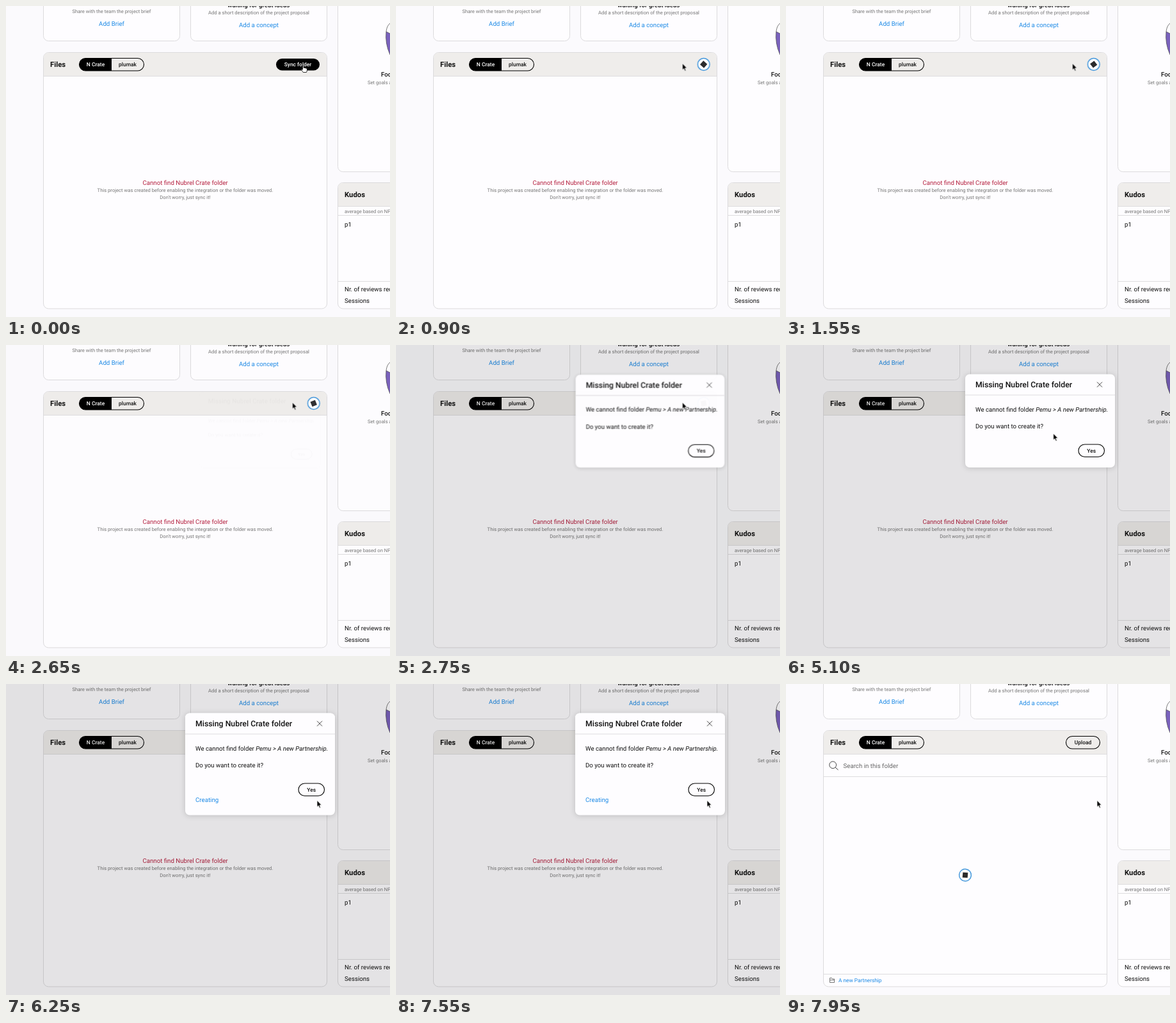
An HTML page that plays this animation: 600x485 px, repeating every 8000 ms.

```html
<!DOCTYPE html>
<html lang="en">
<head>
<meta charset="utf-8">
<title>Sync folder</title>
<style>
html, body { margin: 0; width: 100%; height: 100%; overflow: hidden; background: #fbfafd; }
svg { display: block; width: 600px; height: 485px; }
text { font: 9.7px Roboto, sans-serif; fill: #111; text-rendering: geometricPrecision; }
.small { font-size: 7.65px; fill: #777; }
.head { font-size: 11.3px; font-weight: 700; }
.title { font-size: 12.3px; font-weight: 500; }
.button { font-size: 8.45px; font-weight: 500; }
.medium { font-weight: 500; }
.link { fill: #1c8ae6; }
.error { fill: #b5203f; }
.light { fill: #fff; }
.mid { text-anchor: middle; }
.card { fill: #fefdff; stroke: #dcdbdd; }
.bar { fill: #efedeb; }
.rule { stroke: #dedddf; fill: none; }
.pill { fill: none; stroke: #000; stroke-width: 1.1; }
.solid { fill: #000; }

/* One loop is 8 s: 1.25% = 100 ms */
.sync, .busy, .before, .after, .creating, .hover, .hand, .arrow {
  animation: 8s step-end infinite;
}
.sync { animation-name: sync; }
.busy { animation-name: busy; }
.before { animation-name: before; }
.after { animation-name: after; }
.creating { animation-name: creating; }
.hover { animation-name: hover; }
.hand { animation-name: hand; }
.arrow { animation-name: arrow; }
@keyframes sync { 0% { opacity: 1 } 1.875%, 100% { opacity: 0 } }
@keyframes busy { 0% { opacity: 0 } 1.875% { opacity: 1 } 35.625%, 100% { opacity: 0 } }
@keyframes before { 0% { opacity: 1 } 95%, 100% { opacity: 0 } }
@keyframes after { 0% { opacity: 0 } 95%, 100% { opacity: 1 } }
@keyframes creating { 0% { opacity: 0 } 72.5%, 100% { opacity: 1 } }
@keyframes hover { 0% { opacity: 0 } 66.875% { opacity: 1 } 75%, 100% { opacity: 0 } }
@keyframes hand { 0% { opacity: 1 } 1.875% { opacity: 0 } 66.875% { opacity: 1 } 75%, 100% { opacity: 0 } }
@keyframes arrow { 0% { opacity: 0 } 1.875% { opacity: 1 } 66.875% { opacity: 0 } 75%, 100% { opacity: 1 } }

.spin { animation: spin 1.6s -50ms linear infinite; }
@keyframes spin { to { transform: rotate(360deg) } }

.dim { animation: fade 8s cubic-bezier(.16, 1, .3, 1) infinite; }
.dialog {
  transform-origin: 397px 118px;
  animation: fade 8s cubic-bezier(.16, 1, .3, 1) infinite, pop 8s cubic-bezier(.16, 1, .3, 1) infinite;
  filter: drop-shadow(0 1px 4px rgba(0, 0, 0, .16));
}
@keyframes fade { 0%, 33.125% { opacity: 0 } 35.625%, 95% { opacity: 1 } 97.5%, 100% { opacity: 0 } }
@keyframes pop {
  0%, 33.125% { transform: translateY(15px) scale(.8) }
  35.625%, 95% { transform: none }
  97.5%, 100% { transform: translateY(15px) scale(.8) }
}

.cursor { animation: move 8s ease-in-out infinite; }
@keyframes move {
  0%, 1.875% { transform: translate(464px, 92px) }
  8.75%, 37.5% { transform: translate(447.5px, 89.5px) }
  45.625%, 48.75% { transform: translate(300px, 103px) }
  54.375% { transform: translate(292px, 124px) }
  61.875% { transform: translate(404px, 132px) }
  68.125%, 71.875% { transform: translate(476px, 163px) }
  76.875%, 100% { transform: translate(486px, 181.5px) }
}
</style>
</head>
<body>
<svg viewBox="0 0 600 485">
  <defs>
    <g id="spinner">
      <circle r="9.4" fill="#fff" stroke="#4598dc" stroke-width="1.5"/>
      <rect class="spin" x="-4" y="-4" width="8" height="8" fill="#2b2b2d"/>
    </g>
  </defs>
  <rect width="600" height="485" fill="#fbfafd"/>

  <!-- Brief and concept -->
  <rect class="card" x="58.5" y="-40.5" width="213" height="95" rx="8"/>
  <text class="small mid" x="165" y="10.5">Share with the team the project brief</text>
  <text class="link mid" x="165" y="31">Add Brief</text>
  <rect class="card" x="288.5" y="-40.5" width="213" height="95" rx="8"/>
  <text class="medium mid" x="394.7" y="2">waiting for great ideas</text>
  <text class="small mid" x="395" y="12.7">Add a short description of the project proposal</text>
  <text class="link mid" x="395" y="33">Add a concept</text>

  <!-- Focus -->
  <rect class="card" x="518.5" y="-40.5" width="200" height="299" rx="8"/>
  <path d="M594 40Q592 58 600 76V43Z" fill="#7a62bd"/>
  <path d="M600 76Q592 58 594 40Q595 31 600 27M594 40L600 43" fill="none" stroke="#444" stroke-width=".7"/>
  <text class="medium" x="586" y="110">Focus</text>
  <text class="small" x="565" y="121.5">Set goals and</text>

  <!-- Kudos -->
  <rect class="card" x="518.5" y="275.5" width="200" height="196.5" rx="8"/>
  <path class="bar" d="M519 312V283.5Q519 276 526.5 276H600V312Z"/>
  <path class="rule" d="M519 312.5H600M519 326.5H600M519 429.5H600"/>
  <text class="head" x="529" y="298">Kudos</text>
  <text class="small" x="529" y="322.5">average based on NPS</text>
  <text x="529" y="343.5">p1</text>
  <text x="529" y="444.5">Nr. of reviews received</text>
  <text x="529" y="462.7">Sessions</text>

  <!-- Files -->
  <rect class="card" x="58.5" y="72.5" width="443" height="399.5" rx="8"/>
  <path class="bar" d="M59 109V80.5Q59 73 66.5 73H493.5Q501 73 501 80.5V109Z"/>
  <path class="rule" d="M59 109.5H501"/>
  <text class="head" x="69" y="95">Files</text>
  <path d="M165 81.5H124.2A9.75 9.75 0 0 0 124.2 101H165Z"/>
  <rect class="pill" x="114.5" y="81.5" width="101" height="19.5" rx="9.75"/>
  <text class="button light mid" x="140" y="94.2">N Crate</text>
  <text class="button mid" x="190" y="94.2">plumak</text>

  <g class="before">
    <g class="sync">
      <rect class="solid" x="422" y="82" width="68" height="18.5" rx="9.25"/>
      <text class="button light mid" x="456" y="94.2">Sync folder</text>
    </g>
    <g class="busy"><use href="#spinner" transform="translate(480.7 91)"/></g>
    <text class="error mid" x="280" y="279">Cannot find Nubrel Crate folder</text>
    <text class="small mid" x="280" y="290.3">This project was created before enabling the integration or the folder was moved.</text>
    <text class="small mid" x="280" y="300.8">Don't worry, just sync it!</text>
  </g>

  <g class="after">
    <rect class="pill" x="437.5" y="81.5" width="53" height="19.5" rx="9.75"/>
    <text class="button mid" x="464" y="94.2">Upload</text>
    <path class="rule" d="M59 144.5H501M59 452.5H501"/>
    <path d="M77.3 130.2L81.5 134" stroke="#333" fill="none"/>
    <circle cx="73.2" cy="126.2" r="5.4" fill="none" stroke="#333" stroke-width=".9"/>
    <text x="89.5" y="130.7" style="fill:#666">Search in this folder</text>
    <use href="#spinner" transform="translate(280 298) rotate(-40)"/>
    <path d="M68.5 465.5V458.5H71.5L72.5 460H75.5V465.5ZM68.5 461.7H75.5" fill="none" stroke="#555" stroke-width=".8"/>
    <text class="link" x="82" y="465.2" style="font-size:8.3px">A new Partnership</text>
  </g>

  <!-- Dialog -->
  <rect class="dim" width="600" height="485" fill-opacity=".1"/>
  <g class="dialog">
    <rect x="280" y="45.5" width="234" height="145.5" rx="7" fill="#fefdff"/>
    <g class="creating">
      <rect x="280" y="45.5" width="234" height="159" rx="7" fill="#fefdff"/>
      <text class="link" x="296" y="184.3">Creating</text>
    </g>
    <path class="rule" d="M280 78H514"/>
    <text class="title" x="296" y="65.8">Missing Nubrel Crate folder</text>
    <path d="M486 57.7L494 65.7M494 57.7L486 65.7" stroke="#333" stroke-width=".9"/>
    <text x="296" y="103.7">We cannot find folder <tspan font-style="italic">Pemu &gt; A new Partnership.</tspan></text>
    <text x="296" y="130.2">Do you want to create it?</text>
    <rect class="pill" x="457" y="155" width="40.5" height="19.5" rx="9.75"/>
    <text class="button mid" x="477.2" y="167.8">Yes</text>
    <g class="hover">
      <rect class="solid" x="456.5" y="154.5" width="41.5" height="20.5" rx="10.25"/>
      <text class="button light mid" x="477.2" y="167.8">Yes</text>
    </g>
  </g>

  <g class="cursor">
    <path class="arrow" d="M0 0V10.3L2.3 8.2L3.9 11.9L5.6 11.2L4 7.6H7.2Z" stroke="#fff" stroke-width=".8"/>
    <path class="hand" d="M-.6 7.2V1Q.3-.6 1.2 1V4.6Q2.3 3.5 3 4.8Q4 3.9 4.7 5.2Q6.4 4.5 6.4 6.4V8.5Q6.2 10 5.4 11.5H.4Q-.8 9.8-2.6 7.5Q-2.6 6-.6 7.2Z" fill="#fff" stroke="#000" stroke-width=".8"/>
  </g>
</svg>
</body>
</html>
```
